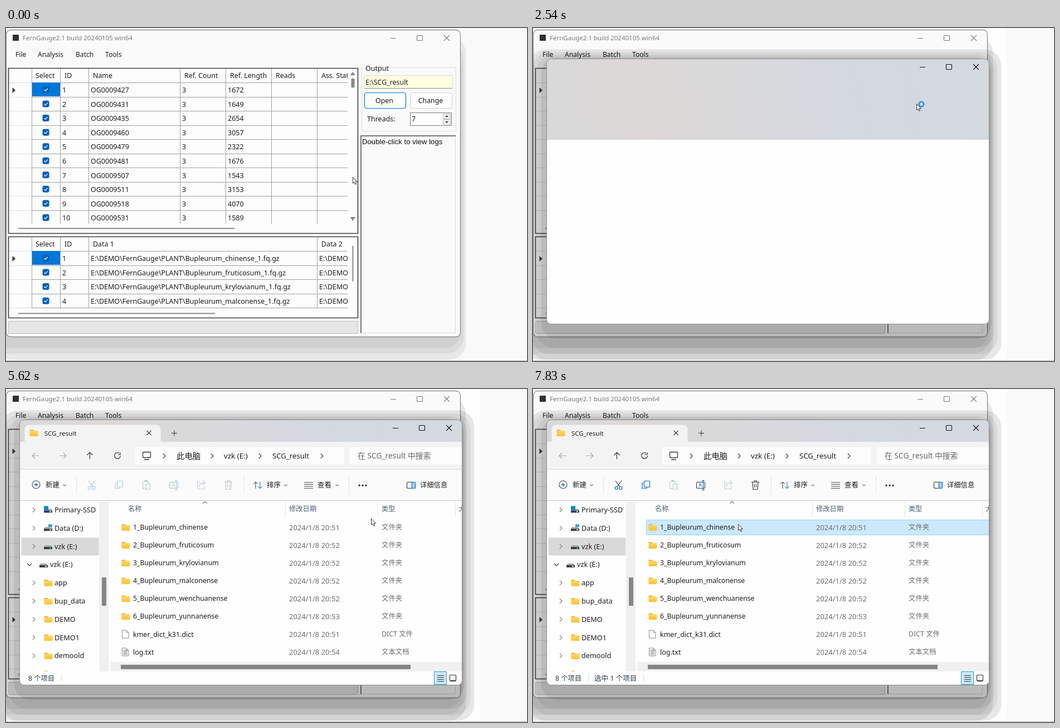
Write an HTML page with a canvas that moves like this. It is 935 px wide and 599 px high and loops after 8 s.

```html
<!DOCTYPE html>
<html lang="zh">
<head>
<meta charset="utf-8">
<style>
html, body { margin: 0; width: 100%; height: 100%; overflow: hidden; background: #f9f9f9; }
canvas { display: block; }
</style>
</head>
<body>
<canvas id="stage" width="935" height="599"></canvas>
<script>
const ctx = document.getElementById('stage').getContext('2d');
const LOOP = 8000;
const SANS = '"Noto Sans", "Noto Sans CJK SC", "Noto Sans CJK", sans-serif';
const ARIAL = '"Liberation Sans", sans-serif';
const SPECIES = ['chinense', 'fruticosum', 'krylovianum', 'malconense', 'wenchuanense', 'yunnanense'];

// time, x, y of the pointer; each position is held until the next
const POINTER = [
  [0, 622, 268], [120, 624, 262], [260, 632, 240], [400, 645, 212], [540, 659, 184],
  [680, 672, 160], [820, 682, 146], [970, 688, 138], [1110, 688, 136],
  [3540, 672, 146], [3680, 640, 165], [3810, 600, 192], [3930, 561, 216], [4050, 552, 224],
  [4190, 552, 236], [4320, 556, 240], [4470, 570, 243], [4620, 590, 245], [4770, 612, 246],
  [4910, 634, 246], [5060, 652, 244], [5210, 668, 241], [5350, 678, 237], [5500, 683, 232],
  [5620, 655, 233], [5930, 648, 240], [6060, 612, 276], [6200, 566, 318], [6320, 524, 358],
  [6470, 498, 392], [6600, 482, 414], [7000, 462, 372], [7130, 428, 318], [7260, 392, 268],
  [7380, 368, 243]
];

function rect(x, y, w, h, color) {
  ctx.fillStyle = color;
  ctx.fillRect(x, y, w, h);
}
function box(x, y, w, h, r, fill, stroke, width = 1) {
  ctx.beginPath();
  ctx.roundRect(x + .5, y + .5, w - 1, h - 1, r);
  if (fill) { ctx.fillStyle = fill; ctx.fill(); }
  if (stroke) { ctx.strokeStyle = stroke; ctx.lineWidth = width; ctx.stroke(); }
}
function path(points, stroke, width = 1, fill) {
  ctx.beginPath();
  for (let i = 0; i < points.length; i += 2) ctx.lineTo(points[i], points[i + 1]);
  if (fill) { ctx.closePath(); ctx.fillStyle = fill; ctx.fill(); }
  if (stroke) { ctx.strokeStyle = stroke; ctx.lineWidth = width; ctx.stroke(); }
}
function ring(x, y, r, color, width = 1, from = 0, to = 2 * Math.PI) {
  ctx.beginPath();
  ctx.arc(x, y, r, from, to);
  ctx.strokeStyle = color;
  ctx.lineWidth = width;
  ctx.stroke();
}
function text(s, x, cy, size = 12.4, color = '#1b1b1b', align = 'left', family = SANS, weight = 400) {
  ctx.font = `${weight} ${size}px ${family}`;
  ctx.textAlign = align;
  ctx.fillStyle = color;
  ctx.fillText(s, x, cy + size * .36);
}
function clipped(x, y, w, h, draw) {
  ctx.save();
  ctx.beginPath();
  ctx.rect(x, y, w, h);
  ctx.clip();
  draw();
  ctx.restore();
}
function at(x, y, angle, draw) {
  ctx.save();
  ctx.translate(x, y);
  ctx.rotate(angle * Math.PI / 2);
  draw();
  ctx.restore();
}
// angle counts quarter turns: 0 right, 1 down, 3 up
function chevron(x, y, angle, size = 3.5, color = '#555') {
  at(x, y, angle, () => path([-size / 2, -size, size / 2, 0, -size / 2, size], color, 1.1));
}
function arrow(x, y, angle, color, size = 6) {
  at(x, y, angle, () => {
    path([-size, 0, size, 0], color, 1.2);
    path([size - 5, -5, size, 0, size - 5, 5], color, 1.2);
  });
}
function bands(list, color) {
  for (const [left, top, right, bottom, alpha] of list) {
    ctx.globalAlpha = alpha;
    box(left, top, right - left, bottom - top, 30, color);
  }
  ctx.globalAlpha = 1;
}
function windowButtons(y, x, color) {
  path([x - 5, y + .5, x + 5, y + .5], color);
  box(x + 42, y - 5, 11, 10, 1, null, color, 1.1);
  cross(x + 96, y, 5, color);
}
function cross(x, y, r, color) {
  path([x - r, y - r, x + r, y + r], color, 1.1);
  path([x - r, y + r, x + r, y - r], color, 1.1);
}

function checkbox(x, y) {
  box(x - 6.5, y - 6.5, 13, 13, 3, '#005fb8');
  path([x - 3, y, x - 1, y + 2.3, x + 3.2, y - 2], '#fff', 1.2);
}
function table(top, bottom, clipBottom, columns, headers, rows) {
  const step = 25.55, lineY = top + 26;
  rect(4, top, 628, bottom - top, '#fdfdfd');
  clipped(5, top, 608, clipBottom - top, () => {
    for (let i = 0; i <= rows.length; i++) {
      const y = Math.round(lineY + i * step) + .5;
      path([5, y, 46, y], '#dedede');
      path([46, y, 613, y], '#a0a0a0');
    }
    rect(46, lineY, 51, 25, '#0078d7');
    columns.forEach(x => path([x + .5, top, x + .5, clipBottom], '#a0a0a0'));
    headers.forEach(([s, x]) => text(s, x, top + 13.5));
    rows.forEach((cells, i) => {
      const y = lineY + 13 + i * step;
      checkbox(71.5, y);
      [i + 1, ...cells].forEach((s, c) => text(String(s), columns[c + 1] + 4, y + .7, 12.5));
    });
  });
  path([11.5, lineY + 9, 17, lineY + 14, 11.5, lineY + 19], null, 1, '#3c3c3c');
  box(4, top, 628, bottom - top, 0, null, '#404040', 1.6);
}
function spinner(y, dir) {
  box(784, y, 14, 10, 0, '#f0f0f0', '#bbb');
  path([788, y + 5 + dir, 794, y + 5 + dir, 791, y + 5 - 2 * dir], null, 1, '#333');
}
function mainWindow(t, p) {
  bands([[-20, 15, 826, 597, 1]], '#e8e8e8');
  bands([[-30, 30, 822, 586, 1]], '#dcdcdc');
  bands([[-40, 40, 818, 576, 1]], '#d0d0d0');
  box(0, 3, 816, 553, 8, '#fafafa', '#909090', 1.3);
  rect(12, 12, 11, 11, '#303030');
  text('FernGauge2.1 build 20240105 win64', 30, 18, 11.5, '#7a7a7a');
  windowButtons(18, 695, '#7a7a7a');
  [['File', 17], ['Analysis', 57], ['Batch', 125], ['Tools', 178]].forEach(([s, x]) => text(s, x, 47.5, 12.1));

  const lengths = [1672, 1649, 2654, 3057, 2322, 1676, 1543, 3153, 4070, 1589];
  const ids = [427, 431, 435, 460, 479, 481, 507, 511, 518, 531];
  table(72, 370, 352, [46, 97, 148, 312, 394, 476, 558],
    [['Select', 53], ['ID', 105], ['Name', 156], ['Ref. Count', 320], ['Ref. Length', 402], ['Reads', 484], ['Ass. State', 566]],
    ids.map((id, i) => ['OG0009' + id, 3, lengths[i]]));
  if (t < 400) {
    path([617.5, 85, 627, 85, 622.3, 79], null, 1, '#868686');
    path([617.5, 340, 627, 340, 622.3, 347], null, 1, '#868686');
    box(619, 90, 7, 18, 3, '#868686');
  } else rect(621.5, 91, 2, 17, '#868686');
  rect(22, 359.5, 388, 2, '#8a8a8a');

  table(375, 522, 504, [46, 97, 148, 558],
    [['Select', 53], ['ID', 105], ['Data 1', 156], ['Data 2', 566]],
    SPECIES.slice(0, 4).map(s => [`E:\\DEMO\\FernGauge\\PLANT\\Bupleurum_${s}_1.fq.gz`, 'E:\\DEMO\\FernGauge']));
  rect(621.5, 392, 2, 64, '#868686');
  rect(22, 512.5, 353, 2, '#8a8a8a');
  box(4, 527, 628, 23, 0, '#e6e6e6', '#bcbcbc');

  box(638, 71, 170, 115, 0, null, '#dcdcdc');
  rect(643, 66, 46, 12, '#fafafa');
  text('Output', 645, 72, 12.5);
  box(642, 85, 160, 24, 2, '#ffffe1', '#dcdcdc');
  rect(643, 108, 158, 1, '#8a8a8a');
  text('E:\\SCG_result', 645, 97.5, 12.4);
  const hover = p.x > 643 && p.x < 718 && p.y > 116 && p.y < 145;
  box(643, 116, 75, 29, 4, hover ? '#e0eef9' : '#fdfdfd', '#0078d4', 1.2);
  text('Open', 679, 130.5, 12.4, '#1b1b1b', 'center');
  box(725, 116, 76, 29, 4, '#fdfdfd', '#d0d0d0');
  text('Change', 762, 130.5, 12.4, '#1b1b1b', 'center');
  text('Threads:', 648, 163, 12.5);
  box(725, 152, 75, 24, 0, '#fff', '#7a7a7a');
  text('7', 728, 163.5, 12.5);
  spinner(154, 1);
  spinner(164, -1);
  box(636, 193, 171, 356, 0, '#fafafa', '#dadada');
  rect(636, 193, 171, 2, '#777');
  rect(636, 193, 2, 356, '#777');
  text('Double-click to view logs', 639, 204, 13.2, '#111', 'left', ARIAL);
}

function folder(x, y) {
  box(x, y - 6, 8, 6, 1, '#e8a42c');
  const g = ctx.createLinearGradient(0, y - 4, 0, y + 6);
  g.addColorStop(0, '#ffd868');
  g.addColorStop(1, '#fbc02f');
  box(x, y - 4.5, 16, 11, 1.5, g);
}
function page(x, y, filled) {
  path([x + 1.5, y - 7, x + 9, y - 7, x + 13, y - 3, x + 13, y + 7, x + 1.5, y + 7, x + 1.5, y - 7], '#8a8a8a', 1, '#fff');
  path([x + 9, y - 7, x + 9, y - 3, x + 13, y - 3], '#8a8a8a');
  if (filled) for (let i = -4; i < 6; i += 2) path([x + 3.5, y + i + .5, x + 11, y + i + .5], '#8a8a8a');
}
function drive(x, y, green, badge) {
  path([x + 2, y - 2, x + 13, y - 2, x + 15, y + 1, x, y + 1], null, 1, '#a9a9a9');
  rect(x, y + 1, 15, 4, '#3b3b3b');
  rect(x + 10, y + 2, 3, 2, green ? '#34c24a' : '#ddd');
  if (badge) rect(x, y - 7, 8, 8, '#1683d8');
}
function sidebar() {
  const items = ['Primary-SSD', 'Data (D:)', 'vzk (E:)', 'vzk (E:)', 'app', 'bup_data', 'DEMO', 'DEMO1', 'demoold', ''];
  box(27, 267, 140, 33, 1, '#d9d9d9');
  clipped(25, 202, 142, 306, () => items.forEach((s, i) => {
    const y = 217.5 + 32.8 * i, open = i === 3;
    if (open) chevron(42, y, 1, 4, '#222');
    else if (s) chevron(50, y, 0, 4, '#777');
    if (i > 3) folder(68, y);
    else drive(open ? 60 : 68, y, i === 2, i === 0);
    if (i === 1) rect(76, y - 7, 7, 5, '#4b9cd8');
    text(s, open ? 79 : 87, y, 12.7);
  }));
  rect(167, 202, 17, 306, '#f0f0f0');
  rect(172, 339, 8, 51, '#868686');
}

function fileList(p, state) {
  const heading = '#4c607a', hover = !state.dragging && p.x > 501 && p.x < 667 && p.y > 202 && p.y < 230;
  if (hover) {
    rect(501, 202, 166, 27, '#d9ebf9');
    rect(651, 202, 1, 27, '#b5d5ec');
    chevron(658, 215, 1, 3, heading);
  }
  [501, 667, 806].forEach(x => rect(x, 202, 1, 28, '#e3e3e3'));
  text('名称', 219, 215.5, 12.3, heading);
  text('修改日期', 508, 215.5, 12.3, heading);
  text('类型', 674, 215.5, 12.3, heading);
  clipped(807, 202, 11, 28, () => text('大小', 812, 215.5, 12.3, heading));
  chevron(357, 204, 3, 4, '#777');

  const minutes = [51, 52, 52, 52, 52, 53, 51, 54];
  const names = [...SPECIES.map((s, i) => `${i + 1}_Bupleurum_${s}`), 'kmer_dict_k31.dict', 'log.txt'];
  names.forEach((name, i) => {
    const y = 249 + 32 * i;
    if (i < state.selected) {
      clipped(203, y - 15, 615, 30, () => box(203, y - 14, 625, 28, 0, '#cce8ff', i ? null : '#99d1ff'));
    } else if (!state.selected && p.y >= y - 14 && p.y < y + 14 && state.canHover) {
      rect(203, y - 14, 615, 28, '#e5f3ff');
    }
    if (i < 6) folder(207, y);
    else page(207, y, i === 7);
    text(name, 228, y, i < 6 ? 12.25 : 12.5);
    text('2024/1/8 20:' + minutes[i], 508, y, 13, '#6d6d6d');
    text(i < 6 ? '文件夹' : i < 7 ? 'DICT 文件' : '文本文档', 674, y, 12.4, '#6d6d6d');
  });
  rect(188, 491, 630, 17, '#f0f0f0');
  rect(206, 496, 520, 8, '#858585');
}
function statusBar(count) {
  text('8 个项目', 40, 520.5, 12.3, '#26394f');
  rect(99, 514, 1, 12, '#dadada');
  if (count) {
    text(`选中 ${count} 个项目`, 110, 520.5, 12.5, '#26394f');
    rect(198, 514, 1, 12, '#dadada');
  }
  box(768, 508, 23, 24, 0, '#cbe8f6', '#26a0da');
  for (let y = 515.5; y < 528; y += 3.5) path([774, y, 786, y], '#333');
  box(796, 514, 12, 11, 1, '#fff', '#333', 1.2);
  rect(797, 525, 10, 1, '#333');
}

function topBars() {
  box(33, 64, 245, 40, 8, '#f3f3f4');
  rect(25, 95, 793, 49, '#f3f3f4');
  folder(42, 79);
  text('SCG_result', 69, 79.5, 11.5);
  cross(256.5, 79, 4, '#333');
  path([297, 79.5, 307, 79.5], '#333');
  path([302, 74.5, 302, 84.5], '#333');
  arrow(53, 120, 2, '#a5a5a5');
  arrow(102, 120, 0, '#a5a5a5');
  arrow(150.5, 120, 3, '#333');
  ring(200, 120, 5.3, '#333', 1.2, 0, 5.3);
  path([205, 114, 205, 118, 201, 118], '#333', 1.2);
  box(231, 104, 376, 32, 4, '#fdfdfd');
  clipped(616, 104, 202, 32, () => box(616, 104, 210, 32, 4, '#fdfdfd'));
  box(245, 113, 15, 11, 2, null, '#333', 1.3);
  path([248, 127, 257, 127], '#333', 1.3);
  [284, 370, 456, 567].forEach(x => chevron(x, 120.5, 0, 4, '#333'));
  text('此电脑', 306, 120.5, 14.4);
  text('vzk (E:)', 391, 120.5, 13.4);
  text('SCG_result', 478, 120.5, 13.2);
  text('在 SCG_result 中搜索', 631, 120.5, 13.8, '#666');
}
function commandBar(active) {
  rect(25, 144, 793, 57, '#fbfbfb');
  rect(25, 144, 793, 1, '#d5d5d5');
  rect(25, 200, 793, 1, '#c4c4c4');
  const ink = active ? '#3a3a3a' : '#b9bcc0', blue = active ? '#0067c0' : '#a9cbe8';
  const offInk = '#c3c6ca', offBlue = '#a9cbe8';
  ring(54, 172, 7, '#444', 1.1);
  path([50.5, 172, 57.5, 172], '#0067c0', 1.3);
  path([54, 168.5, 54, 175.5], '#0067c0', 1.3);
  text('新建', 71, 173, 12.4);
  [105, 502, 594].forEach(x => chevron(x, 173, 1, 2.8, '#777'));
  [126, 427, 615].forEach(x => rect(x, 156, 1, 33, '#e2e2e2'));

  path([148, 165, 156, 176], ink, 1.2);
  path([159, 165, 151, 176], ink, 1.2);
  ring(149.5, 178, 2.5, blue, 1.2);
  ring(157.5, 178, 2.5, blue, 1.2);

  path([198, 169, 196, 169, 196, 179, 204, 179, 204, 177], blue, 1.2);
  box(199, 165, 11, 12, 2, null, blue, 1.2);

  box(245, 166, 12, 14, 2, null, offInk, 1.2);
  rect(248, 164, 6, 3, offInk);
  box(251, 170, 8, 11, 1, '#fbfbfb', offBlue, 1.2);

  box(293, 167, 16, 12, 2, null, ink, 1.1);
  text('A', 297, 173, 9.5, blue);
  path([305.5, 164, 305.5, 182], blue, 1.2);
  path([303, 164.5, 308, 164.5], blue);
  path([303, 181.5, 308, 181.5], blue);

  path([348, 167, 344, 167, 344, 180, 356, 180, 356, 175], offInk, 1.2);
  path([347, 176, 348, 171, 352, 169, 357, 169], offBlue, 1.2);
  path([353, 165, 357, 169, 353, 173], offBlue, 1.2);

  path([392, 167.5, 406, 167.5], ink, 1.2);
  path([394, 168, 395, 180.5, 403, 180.5, 404, 168], ink, 1.2);
  path([397, 167, 397, 165, 401, 165, 401, 167], ink, 1.2);
  path([397.5, 171, 397.5, 177], ink);
  path([400.5, 171, 400.5, 177], ink);

  path([444, 171, 448, 167, 452, 171], '#333');
  path([448, 167, 448, 179], '#333');
  path([452, 175, 456, 179, 460, 175], '#0067c0');
  path([456, 167, 456, 179], '#0067c0');
  text('排序', 468, 173, 12.4);
  [168, 171.5, 175, 178.5].forEach(y => path([535, y, 551, y], '#444'));
  text('查看', 559, 173, 12.4);
  [634, 640, 646].forEach(x => rect(x - 1.3, 172, 2.8, 2.8, '#222'));
  box(719, 167, 16, 12, 2, null, '#333', 1.1);
  box(728, 167, 7, 12, 1, '#a7d3f5', '#0067c0', 1.1);
  text('详细信息', 743, 173, 12.3);
}

function explorer(t, p, state) {
  const strength = t < 1660 ? .4 : t < 2120 ? .8 : 1;
  bands([[-8, 38, 841, 597, .09], [-2, 43, 834, 587, .06], [6, 48, 828, 576, .06], [14, 52, 823, 560, .08]]
    .map(([l, u, r, b, a]) => [l, u, r, b, a * strength]), '#000');
  ctx.save();
  if (t < 1660) {
    ctx.globalAlpha = .7;
    ctx.translate(421.5, 294);
    ctx.scale(.95, .95);
    ctx.translate(-421.5, -294);
  }
  box(24, 55, 795, 478, 8, '#fefefe');
  ctx.save();
  ctx.beginPath();
  ctx.roundRect(24.5, 55.5, 794, 477, 8);
  ctx.clip();
  if (t >= 2260) {
    const g = ctx.createLinearGradient(24, 201, 819, 55);
    [[0, '#d9d9da'], [.22, '#dcd8d6'], [.5, '#d8d9dc'], [.72, '#d3d8e1'], [1, '#d5d9e0']].forEach(s => g.addColorStop(...s));
    rect(24, 55, 795, 146, g);
    windowButtons(70, 699, '#111');
  }
  if (t >= 2560) sidebar();
  if (t >= 2850) {
    fileList(p, state);
    statusBar(state.counted);
  }
  if (t >= 3420) topBars();
  if (t >= 3540) commandBar(state.selected > 0);
  ctx.restore();
  box(24, 55, 795, 478, 8, null, '#8e8e8e');
  ctx.restore();
}

function pointer(p, busy, pressed) {
  const shape = [0, 0, 0, 11, 2.6, 8.8, 4.4, 12.8, 6.2, 12, 4.5, 8.2, 7.8, 8, 0, 0];
  if (pressed) ring(p.x + 1, p.y + 1, 7, '#444');
  path(shape.map((v, i) => v + (i % 2 ? p.y : p.x) + .5), '#333', 1, '#fff');
  if (busy) ring(p.x + 9, p.y + 1, 4.3, '#1c8df0', 2.4);
}
function stateAt(t, p) {
  const dragging = t >= 5930 && t < 6870;
  const corner = { x: p.x + 3, y: p.y - 6 };
  let selected = 0;
  if (dragging) selected = Math.max(0, Math.min(6, Math.ceil((corner.y - 235) / 32)));
  else if (t >= 7680) selected = 1;
  else if (t >= 6870) selected = 6;
  const counted = selected && (t >= 7000 && t < 7830 ? 6 : 1);
  return { dragging, corner, selected, counted, canHover: t > 4000 && t < 5930 };
}

function draw(t) {
  const [, x, y] = POINTER.findLast(k => k[0] <= t);
  const p = { x, y }, state = stateAt(t, p), opened = t >= 1510;
  rect(0, 0, 935, 599, '#f9f9f9');
  if (opened) rect(0, 0, 850, 598, '#fefefe');
  mainWindow(t, p);
  if (opened) explorer(t, p, state);
  if (state.dragging) {
    const { corner } = state;
    box(corner.x, 233, 655 - corner.x, Math.max(1, corner.y - 233), 0, 'rgba(30,120,215,.42)', '#0067c0', 1.2);
  }
  rect(0, 598, 935, 1, '#b4b4b4');
  pointer(p, opened && t < 3000, state.dragging);
}
function frame(now) {
  draw(now % LOOP);
  requestAnimationFrame(frame);
}
draw(0);
requestAnimationFrame(frame);
</script>
</body>
</html>
```
